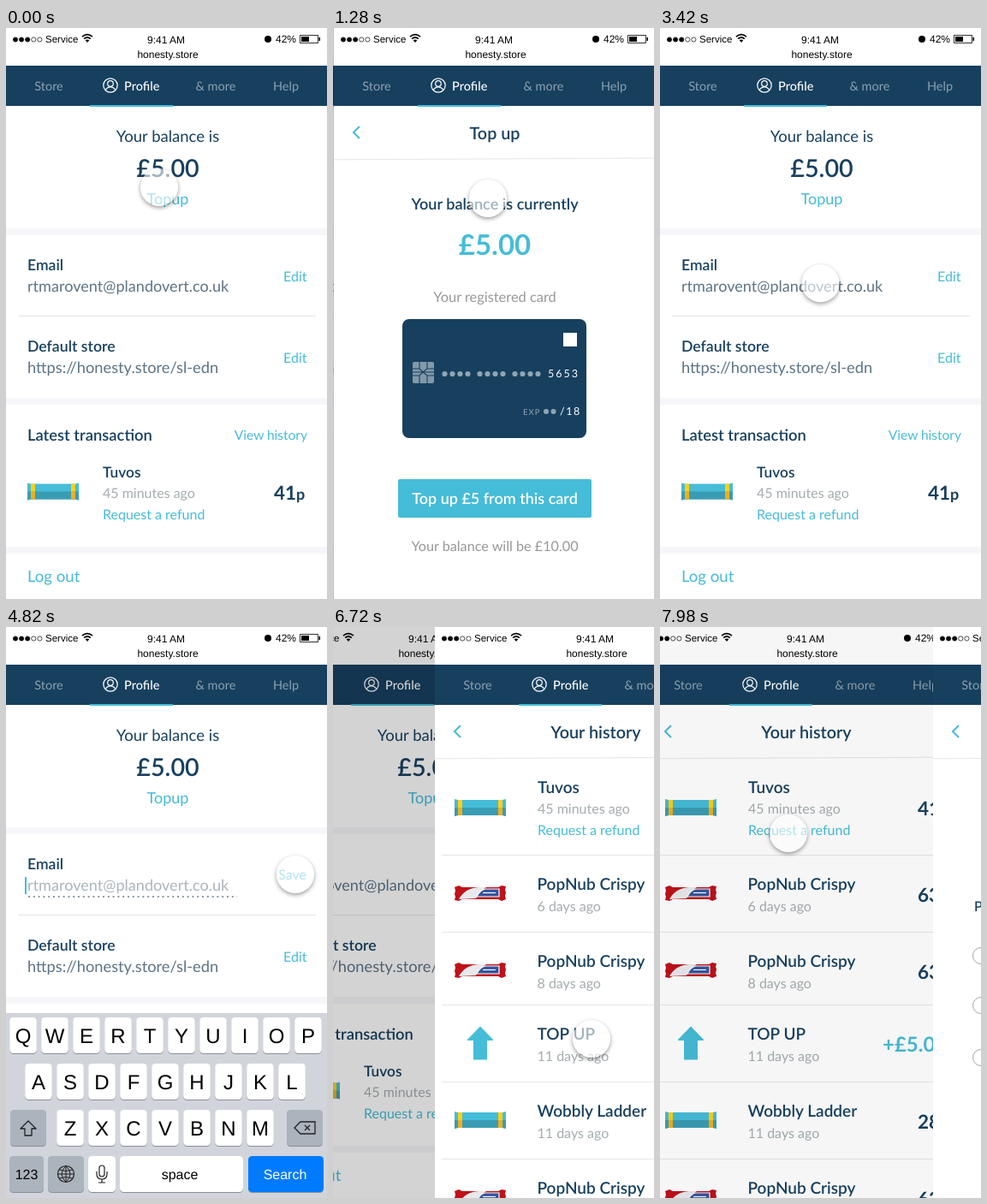
These frames come from a looping animation (375 px wide and 667 px high, 8 s). An HTML page:

```html
<!DOCTYPE html>
<html lang="en">
<head>
<meta charset="utf-8">
<title>Balance and history prototype</title>
<style>
  html, body { margin: 0; width: 100%; height: 100%; overflow: hidden; background: #fff; }
  svg { position: absolute; left: 0; top: 0; width: 375px; height: 667px; }
  text { font-family: Lato, "Open Sans", sans-serif; text-rendering: geometricPrecision; white-space: pre; }
  .system { font-family: "Liberation Sans", Inter, sans-serif; }
  .medium { font-weight: 500; }
  .bold { font-weight: 600; }
  .heavy { font-weight: 700; }
  .mid { text-anchor: middle; }
  .end { text-anchor: end; }
  #touch {
    position: absolute; left: -22px; top: -22px; width: 44px; height: 44px; border-radius: 50%;
    background: rgba(255, 255, 255, .6); box-shadow: 0 2px 5px rgba(0, 0, 0, .4);
  }
</style>
</head>
<body>
<svg id="stage" viewBox="0 0 375 667"></svg>
<div id="touch"></div>
<script>
const LOOP = 8000, WIDTH = 375, SLIDE = 350;
const NAVY = '#17405f', CYAN = '#45bcd8', GREY = '#989898', PALE = '#a4adb0', STRIP = '#f6f6fa', LINE = '#e3e5e7';

// Drawing helpers returning SVG markup
const text = (x, y, size, fill, str, cls = '', extra = '') =>
  `<text x="${x}" y="${y}" font-size="${size}" fill="${fill}" class="${cls}" ${extra}>${str}</text>`;
const rect = (x, y, w, h, fill, r = 0) =>
  `<rect x="${x}" y="${y}" width="${w}" height="${h}" fill="${fill}" rx="${r}"/>`;
const path = (d, fill, stroke = 'none', width = 1, extra = '') =>
  `<path d="${d}" fill="${fill}" stroke="${stroke}" stroke-width="${width}" ${extra}/>`;
const circle = (x, y, r, fill, stroke = 'none', width = 1) =>
  `<circle cx="${x}" cy="${y}" r="${r}" fill="${fill}" stroke="${stroke}" stroke-width="${width}"/>`;
const at = (x, y, content) => `<g transform="translate(${x} ${y})">${content}</g>`;
const repeat = (n, draw) => Array.from({ length: n }, (_, i) => draw(i)).join('');

const statusBar = () =>
  repeat(5, i => circle(11 + i * 7.1, 13.5, 2.6, i < 3 ? '#000' : 'none', '#000', .7)) +
  text(46, 17, 11.5, '#000', 'Service', 'system') +
  path('M89 10.2Q95 5.2 101 10.2M91.2 12.6Q95 9.4 98.8 12.6', 'none', '#000', 1.7) +
  path('M95 17l-2.3-2.7q2.3-1.8 4.6 0z', '#000') +
  text(187, 18, 12, '#000', '9:41 AM', 'system mid') +
  text(189, 35, 12, '#000', 'honesty.store', 'system mid') +
  circle(306, 13, 4, '#000') +
  text(315, 17, 12, '#000', '42%', 'system') +
  path('M343.5 8.5h21v9h-21z', 'none', '#000', .8) + rect(345, 10, 9, 6, '#000') + rect(365.5, 11, 1.5, 4, '#000');

const navBar = () =>
  rect(0, 44, WIDTH, 47, NAVY) +
  text(50, 73, 14.5, '#8ba0af', 'Store', 'mid') +
  circle(122, 67, 8.2, 'none', '#fff', 1.2) + circle(122, 65, 3.3, 'none', '#fff', 1.2) +
  path('M116 72.5q2.5-3.6 6-3.6t6 3.6', 'none', '#fff', 1.2) +
  text(138, 73, 14.5, '#fff', 'Profile', 'medium') +
  text(245, 73, 14.5, '#8ba0af', '&amp; more', 'mid') +
  text(327, 73, 14.5, '#8ba0af', 'Help', 'mid') +
  rect(98, 90, 97, 2, CYAN);

const titleBar = title =>
  path('M30 115l-7 7 7 7', 'none', CYAN, 2) +
  text(188, 130, 19.8, NAVY, title, 'bold mid') +
  path('M0 153.8L375 152', 'none', LINE);

const tealBar = (x, y) => at(x, y,
  path('M-30-10l4 1h52l4-1v20l-4-1h-52l-4 1z', CYAN) +
  path('M-30 0h60v10l-4-1h-52l-4 1z', '#3a9cb3') +
  [-26, 21].map(s => rect(s, -9, 5, 9, '#fdd017') + rect(s, 0, 5, 9, '#eeb01c')).join(''));

const redBar = (x, y) => at(x, y,
  path('M-30-7l5-2 4 2h42l4-2 5 1-1 4 1 3-1 4 1 4-5 2-4-2h-42l-4 2-5-1 1-4-1-3 1-4z', '#bf1219') +
  path('M-25 7Q-18-6-2-7H7Q-2-1-5 6z', '#e9e9ec') +
  path('M-4 4Q0-4 6-5h16v9z', '#34549c', '#fff', 1.2) +
  path('M3-.5H18', 'none', '#fff', 1.2));

const arrow = (x, y) => at(x, y, path('M0-19.500L15-4V-3H8V19.500H-8V-3H-15V-4z', CYAN));

const pence = (x, y, n) => text(x, y, 22.5, NAVY, `${n}<tspan font-size="18">p</tspan>`, 'heavy');

function keyboard() {
  const key = (x, y, w, fill = '#fff') => rect(x, y + 1, w, 42, '#8b8f94', 4.5) + rect(x, y, w, 42, fill, 4.5);
  const letters = (str, x, y) => [...str].map((c, i) =>
    key(x + i * 37 - 15.8, y, 31.6) + text(x + i * 37, y + 30, 24, '#000', c, 'system mid')).join('');
  const dark = '#abb3bc';
  return rect(0, 451, WIDTH, 216, '#d1d5db') +
    letters('QWERTYUIOP', 20, 456) + letters('ASDFGHJKL', 38, 510) + letters('ZXCVBNM', 75, 564) +
    key(5, 564, 42, dark) + path('M26 577l9 9h-5v8h-8v-8h-5z', 'none', '#222', 1.3, 'stroke-linejoin="round"') +
    key(328, 564, 42, dark) + path('M337 585l7-7h17v14h-17zM349 582l6 6m0-6l-6 6', 'none', '#222', 1.3) +
    key(4, 618, 40, dark) + text(24, 645, 16, '#000', '123', 'system mid') +
    key(49, 618, 42, dark) + circle(70, 639, 9.5, 'none', '#222', 1.2) +
    path('M60.5 639h19M70 629.5v19M62.5 634q7.5 3 15 0M62.5 644q7.5-3 15 0M70 629.5q-10 9.5 0 19M70 629.5q10 9.5 0 19', 'none', '#222', 1) +
    key(96, 618, 32) + `<rect x="109" y="629" width="6" height="13" rx="3" fill="none" stroke="#222" stroke-width="1.2"/>` +
    path('M106 636v3q0 6 6 6t6-6v-3M112 645v4m-4 0h8', 'none', '#222', 1.2) +
    key(133, 618, 144) + text(203, 645, 16, '#000', 'space', 'system mid') +
    key(283, 618, 88, '#007aff') + text(326, 645, 16, '#fff', 'Search', 'system mid');
}

const EMAIL = 'rtmarovent@plandovert.co.uk';
const profile = () =>
  text(189, 133, 18.5, NAVY, 'Your balance is', 'mid') +
  text(189, 174, 28.7, NAVY, '£5.00', 'bold mid') +
  text(189, 206, 18, CYAN, 'Topup', 'mid') +
  rect(0, 234, WIDTH, 8, STRIP) +
  text(25, 283, 17.6, NAVY, 'Email', 'bold') +
  `<g id="shown">${text(25, 308, 18.1, '#5d7486', EMAIL) + text(351.5, 296, 16, CYAN, 'Edit', 'end')}</g>` +
  `<g id="editing">${text(25, 308, 18.1, '#abb5bc', EMAIL) +
    path('M26 315H270', 'none', '#8f9aa2', 2, 'stroke-dasharray="2 3.8"') +
    rect(22, 292, 2, 20, CYAN) + text(351, 295, 16, CYAN, 'Save', 'end')}</g>` +
  rect(14, 336, 348, 1, LINE) +
  text(25, 378, 17.7, NAVY, 'Default store', 'bold') +
  text(25, 403, 18.3, '#5d7486', 'https://honesty.store/sl-edn') +
  text(351.5, 391, 16, CYAN, 'Edit', 'end') +
  rect(0, 432, WIDTH, 8, STRIP) +
  text(25, 482, 18.4, NAVY, 'Latest transaction', 'bold') +
  text(352, 481, 15.5, CYAN, 'View history', 'end') +
  tealBar(55, 541.5) +
  text(113, 525, 17.3, NAVY, 'Tuvos', 'bold') +
  text(113, 549, 16, PALE, '45 minutes ago') +
  text(113, 574, 16, CYAN, 'Request a refund') +
  pence(313, 551, 41) +
  rect(0, 606, WIDTH, 8, STRIP) +
  text(25, 647, 18.6, CYAN, 'Log out') +
  `<g id="keyboard">${keyboard()}</g>`;

const topUp = () =>
  titleBar('Top up') +
  text(188, 212, 18.1, NAVY, 'Your balance is currently', 'bold mid') +
  text(188, 265, 33, CYAN, '£5.00', 'heavy mid') +
  text(188, 320, 16.4, GREY, 'Your registered card', 'mid') +
  rect(80, 340, 215, 139, NAVY, 8) +
  rect(268, 356, 16, 16, '#fff') +
  rect(92, 390, 25, 25, '#8299a9', 2) +
  path('M92 398h8l4 4 5-4h8M92 406h8l4-4 5 4h8M100 390v8m9-8v8m-9 8v9m9-9v9M92 402h25', 'none', NAVY, 1.1) +
  repeat(12, i => circle(129.5 + i * 9 + Math.floor(i / 4) * 5, 404, 3.1, '#90a5b3')) +
  text(250, 408, 12.5, '#fff', '5653', '', 'letter-spacing="2"') +
  text(221, 452, 9.5, '#90a5b3', 'EXP', '', 'letter-spacing="1"') +
  circle(248, 448, 3, '#90a5b3') + circle(256.5, 448, 3, '#90a5b3') +
  text(264, 452, 12.5, '#fff', '/18', '', 'letter-spacing="1.5"') +
  rect(75, 527, 226, 45, CYAN, 2) +
  text(188, 556, 18, '#fff', 'Top up £5 from this card', 'bold mid') +
  text(188, 611, 16.2, GREY, 'Your balance will be £10.00', 'mid');

function history() {
  const row = (y, icon, name, age, price) =>
    icon(53, y + 4) + text(119.5, y, 19, NAVY, name, 'bold') + text(119.5, y + 25, 16, PALE, age) +
    (price ? pence(318, y + 14, price) : text(277, y + 14, 24, CYAN, '+£5.00', 'heavy'));
  return titleBar('Your history') +
    tealBar(53, 211) + text(120, 194, 19, NAVY, 'Tuvos', 'bold') + text(120, 218, 16, PALE, '45 minutes ago') +
    text(120, 243, 16, CYAN, 'Request a refund') + pence(318, 220, 41) +
    row(307, redBar, 'PopNub Crispy', '6 days ago', 63) +
    row(397, redBar, 'PopNub Crispy', '8 days ago', 63) +
    row(482, arrow, 'TOP UP', '11 days ago') +
    row(572, tealBar, 'Wobbly Ladder', '11 days ago', 28) +
    row(662, redBar, 'PopNub Crispy', '12 days ago', 63) +
    [266, 356, 441, 531, 621].map(y => rect(8, y, 367, 1, LINE)).join('');
}

const refund = () =>
  titleBar('') + text(48, 332, 16, NAVY, 'Please', 'bold') +
  [384, 442, 503].map(y => circle(56, y, 9.5, '#fff', '#a5a5a5')).join('');

const stage = document.getElementById('stage');
const touch = document.getElementById('touch');

function makePage(content) {
  const page = document.createElementNS('http://www.w3.org/2000/svg', 'g');
  page.innerHTML = rect(0, 0, WIDTH, 667, '#fff') + content() + statusBar() + navBar() + rect(0, 0, WIDTH, 667, '#000');
  return page;
}
const [profilePage, topUpPage, historyPage, refundPage] = [profile, topUp, history, refund].map(makePage);
const find = id => profilePage.querySelector('#' + id);
const shown = find('shown'), editing = find('editing'), keys = find('keyboard');

// side: 1 enters from the right, -1 from the left
const slides = [
  { start: -SLIDE, from: topUpPage, to: profilePage, side: -1 },
  { start: 955, from: profilePage, to: topUpPage, side: 1 },
  { start: 2693, from: topUpPage, to: profilePage, side: -1 },
  { start: 6581, from: profilePage, to: historyPage, side: 1 },
  { start: 7935, from: historyPage, to: refundPage, side: 1 },
];

// start, end, from, to and an optional bend point
const moves = [
  [0, 400, [179, 186], [181, 199]],
  [1300, 2300, [181, 199], [27, 124]],
  [2950, 3890, [27, 124], [338, 289], [191.5, 389.5]],
  [5780, 6450, [338, 289], [302, 481]],
  [6900, 7700, [302, 481], [150, 241]],
];

const bezier = (s, a, b) => 3 * (1 - s) ** 2 * s * a + 3 * (1 - s) * s * s * b + s ** 3;
const progress = (t, start, end) => Math.min(1, Math.max(0, (t - start) / (end - start)));

// CSS "ease" timing curve, solved by bisection
function ease(t, start, length) {
  const u = progress(t, start, start + length);
  if (u === 0 || u === 1) return u;
  let low = 0, high = 1;
  for (let i = 0; i < 24; i++) {
    const s = (low + high) / 2;
    if (bezier(s, .25, .25) < u) low = s; else high = s;
  }
  return bezier(low, .1, 1);
}

function place(page, x, dim) {
  page.setAttribute('transform', `translate(${Math.round(x)} 0)`);
  page.lastChild.setAttribute('opacity', dim);
}

function touchPosition(t) {
  const [start, end, a, b, bend] = moves.filter(m => m[0] <= t).pop();
  const u = progress(t, start, end), s = u * u * (3 - 2 * u);
  return [0, 1].map(i => {
    const c = bend ? bend[i] : (a[i] + b[i]) / 2;
    return (1 - s) ** 2 * a[i] + 2 * s * (1 - s) * c + s * s * b[i];
  });
}

function render(t) {
  const { start, from, to, side } = slides.filter(s => s.start <= t).pop();
  const p = ease(t, start, SLIDE);
  place(from, -side * .3 * WIDTH * p, .25 * p);
  place(to, side * WIDTH * (1 - p), 0);
  if (stage.lastChild !== to || stage.firstChild !== from) stage.replaceChildren(from, to);

  const isEditing = t >= 4200 && t < 5350;
  shown.style.display = isEditing ? 'none' : '';
  editing.style.display = isEditing ? '' : 'none';
  const raised = ease(t, 4220, 400) - ease(t, 5350, 350);
  keys.setAttribute('transform', `translate(0 ${216 * (1 - raised)})`);

  const [x, y] = touchPosition(t);
  touch.style.transform = `translate(${x}px, ${y}px)`;
}

const began = performance.now();
function tick() {
  render((performance.now() - began) % LOOP);
  requestAnimationFrame(tick);
}
tick();
</script>
</body>
</html>
```
